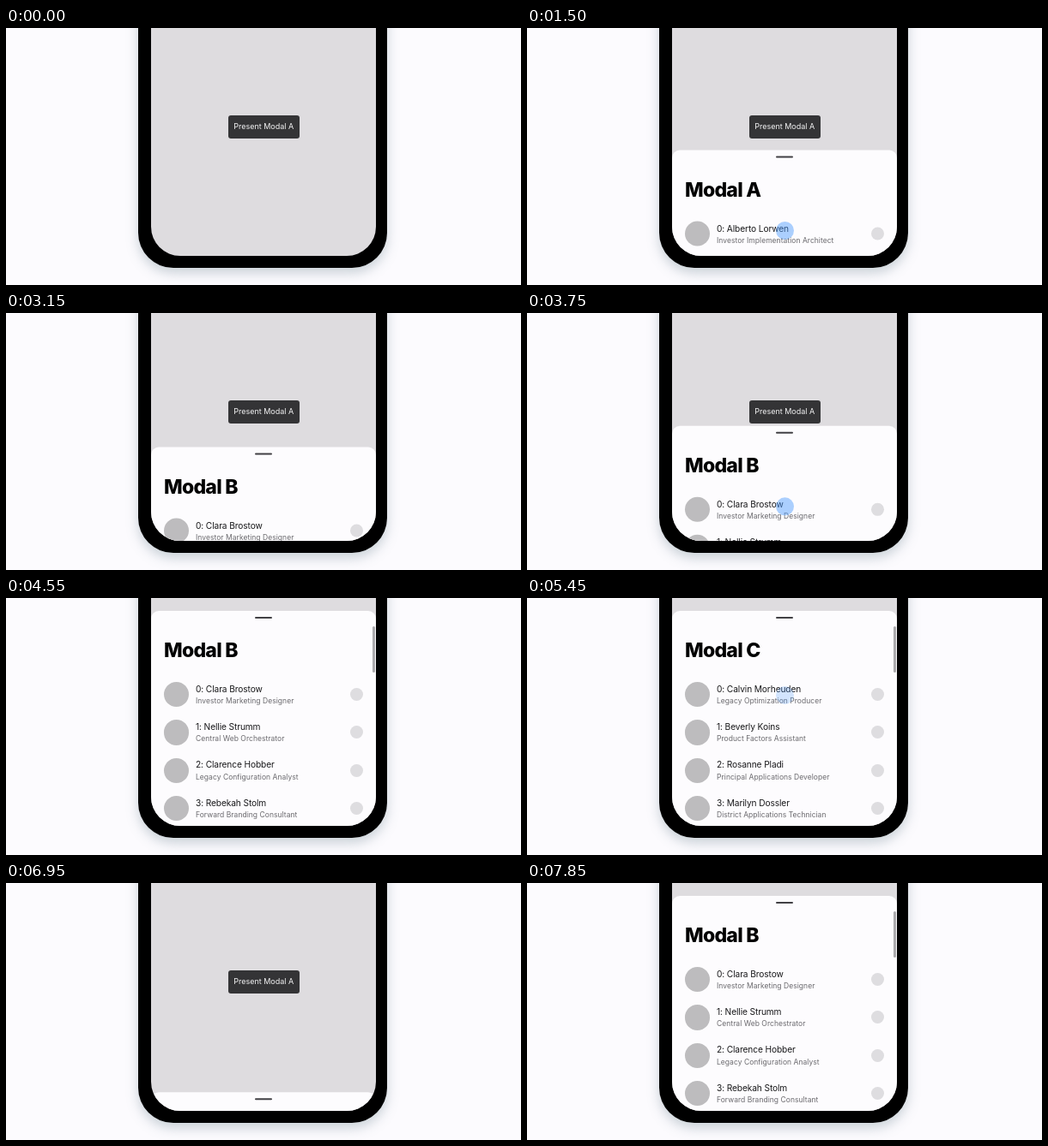
Recreate the animation shown at these times as an HTML page. Size 600 by 300 pixels, loop 8 s.

```html
<!DOCTYPE html>
<html lang="en">
<head>
<meta charset="utf-8">
<title>Stacked modals</title>
<style>
  html, body { margin: 0; width: 100%; height: 100%; overflow: hidden; background: #fcfbfe; }
  body { position: relative; font-family: Inter, Roboto, sans-serif; }
  div { position: absolute; box-sizing: border-box; white-space: nowrap; }
  #phone { left: 153.5px; top: -100px; width: 290px; height: 379.7px; border-radius: 41px; background: #000;
    box-shadow: 0 6px 14px rgba(105, 130, 140, .34); }
  #screen { left: 169px; top: -100px; width: 262px; height: 366.4px; border-radius: 34px;
    background: #dedcdf; overflow: hidden; }
  #button { left: 89.5px; top: 202px; width: 83.5px; height: 26.5px; border-radius: 3px; background: #343436;
    color: #f4f4f5; font-size: 9px; line-height: 26.5px; text-align: center; }
  .sheet { left: 0; top: 100px; width: 262px; height: 300px; border-radius: 9px 9px 0 0; background: #fdfcfe; }
  .handle { left: 121px; top: 6.5px; width: 20px; height: 2.8px; border-radius: 2px; background: #414044; }
  .title { left: 15px; top: 32px; font-size: 23px; font-weight: 800; line-height: 28px; letter-spacing: -.75px; color: #000; }
  .row { left: 0; width: 262px; height: 44.4px; }
  .avatar { left: 15px; top: 7.5px; width: 29.4px; height: 29.4px; border-radius: 50%; background: #bdbcbe; }
  .badge { left: 232px; top: 14.6px; width: 15.2px; height: 15.2px; border-radius: 50%; background: #dedde0; }
  .name { left: 52px; top: 8.4px; font-size: 10.2px; line-height: 14px; letter-spacing: -.12px; color: #19191b; }
  .job { left: 52px; top: 23.7px; font-size: 8.5px; line-height: 12px; letter-spacing: .04px; color: #6b6a6e; }
  .bar { left: 258.2px; top: 18px; width: 2.5px; height: 54px; border-radius: 2px; background: #a9a8ab; }
  #touch { left: 289.5px; top: -10.5px; width: 21px; height: 21px; border-radius: 50%; background: rgba(75, 155, 255, .46); }
</style>
</head>
<body>
<div id="phone"></div>
<div id="screen"><div id="button">Present Modal A</div></div>
<div id="touch"></div>
<script>
const LOOP = 8000, OFF = 275, SHORT = 142.5, FULL = 15;

const clamp = v => Math.min(1, Math.max(0, v));
const glide = p => p * p * (3 - 2 * p);
const settle = p => 1 - (1 - p) ** 3;

// moves: [start, duration, target, easing]; bars: [fade start, fade end, hidden at]
const modals = [
  { title: 'Modal A',
    rows: ['Alberto Lorwen|Investor Implementation Architect', 'Quintin Harlop|Regional Web Coordinator',
           'Matilda Provern|Senior Markets Associate', 'Jasmine Tolby|Dynamic Identity Planner'],
    moves: [[100, 750, SHORT, settle], [1520, 760, FULL, glide], [2850, 280, OFF, glide]],
    bars: [[2370, 2550, 3200]] },
  { title: 'Modal B',
    rows: ['Clara Brostow|Investor Marketing Designer', 'Nellie Strumm|Central Web Orchestrator',
           'Clarence Hobber|Legacy Configuration Analyst', 'Rebekah Stolm|Forward Branding Consultant'],
    moves: [[2850, 571, SHORT, settle], [3600, 850, FULL, glide], [4750, 280, OFF, glide], [7050, 720, FULL, settle]],
    bars: [[4460, 4550, 5050], [7770, 7850, LOOP]] },
  { title: 'Modal C',
    rows: ['Calvin Morheuden|Legacy Optimization Producer', 'Beverly Koins|Product Factors Assistant',
           'Rosanne Pladi|Principal Applications Developer', 'Marilyn Dossler|District Applications Technician'],
    moves: [[4750, 660, FULL, settle], [5460, 630, SHORT, glide], [6690, 380, OFF, glide]],
    bars: [[5370, 5440, 6400]] }
];

// [start, end, y offset, dragged modal if any]
const touches = [
  [30, 320, 115], [1460, 2050, 93.5, 0], [2780, 3060, 113], [3570, 4180, 93.5, 1],
  [4680, 4960, 113], [5430, 5920, 98, 2], [6630, 6880, 30, 2]
];

const add = (parent, name, text = '') => {
  const node = parent.appendChild(document.createElement('div'));
  node.className = name;
  node.textContent = text;
  return node;
};

const screenBox = document.getElementById('screen');
const touch = document.getElementById('touch');

for (const modal of modals) {
  modal.node = add(screenBox, 'sheet');
  add(modal.node, 'handle');
  add(modal.node, 'title', modal.title);
  modal.rows.forEach((entry, i) => {
    const [name, job] = entry.split('|');
    const row = add(modal.node, 'row');
    row.style.top = 75.3 + i * 44.4 + 'px';
    add(row, 'avatar');
    add(row, 'name', `${i}: ${name}`);
    add(row, 'job', job);
    add(row, 'badge');
  });
  modal.bar = add(modal.node, 'bar');
}

function sheetY(moves, t) {
  let y = OFF;
  for (const [start, duration, target, ease] of moves) {
    y += (target - y) * ease(clamp((t - start) / duration));
  }
  return y;
}

function draw(t) {
  for (const modal of modals) {
    modal.y = sheetY(modal.moves, t);
    modal.node.style.transform = `translateY(${modal.y}px)`;
    const shown = modal.bars.find(([start, , end]) => t >= start && t < end);
    modal.bar.style.opacity = shown ? clamp((t - shown[0]) / (shown[1] - shown[0])) : 0;
  }
  const active = touches.find(([start, end]) => t >= start && t < end);
  touch.style.opacity = 0;
  if (active) {
    const [start, end, offset, dragged] = active;
    const y = offset + (dragged === undefined ? 0 : modals[dragged].y);
    touch.style.opacity = Math.min(clamp((t - start) / 40), clamp((end - t) / 150));
    touch.style.transform = `translateY(${y}px)`;
  }
}

const began = performance.now();
function tick() {
  draw((performance.now() - began) % LOOP);
  requestAnimationFrame(tick);
}
draw(0);
requestAnimationFrame(tick);
</script>
</body>
</html>
```
